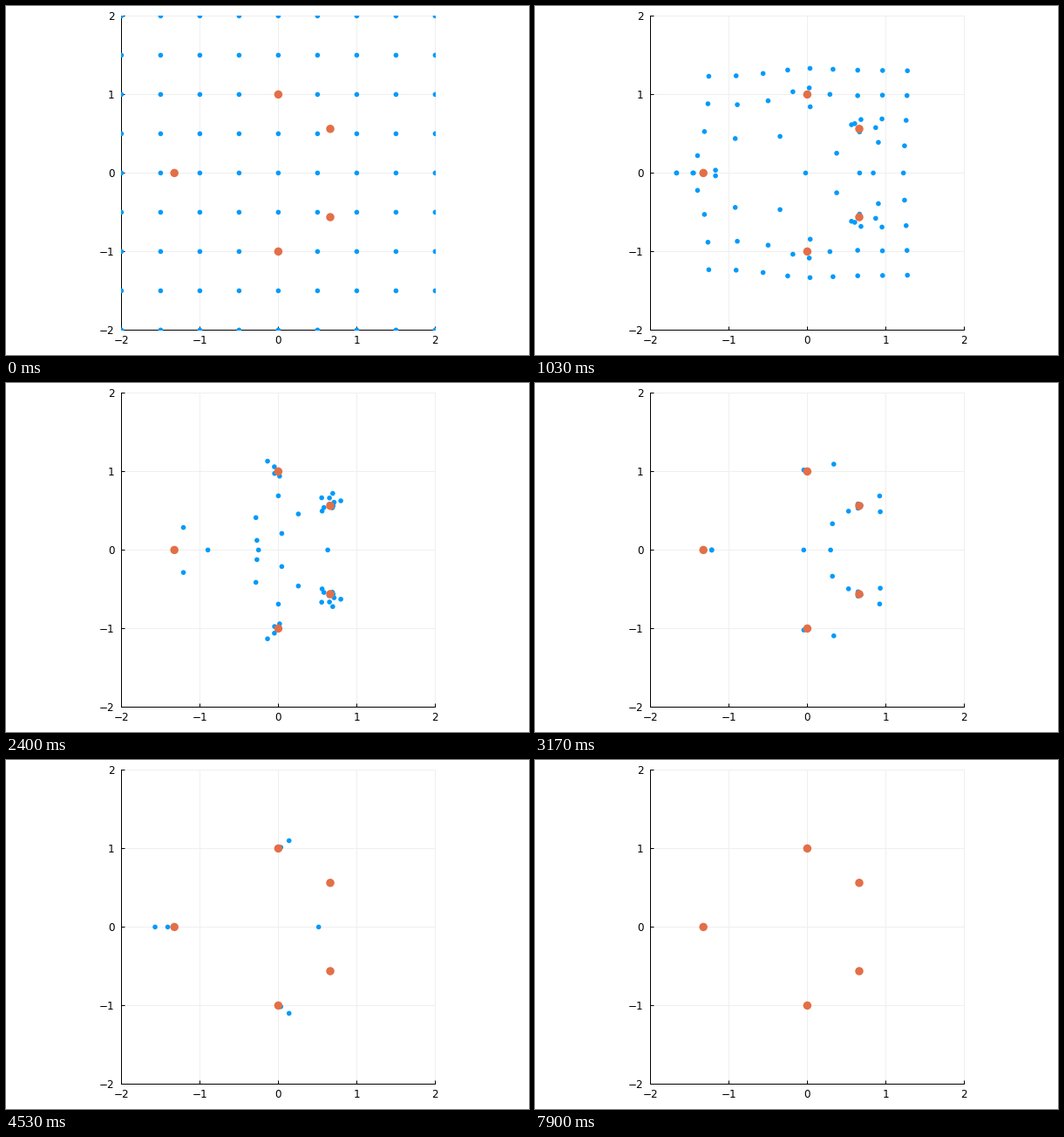
Write a matplotlib script that moves like this. It is 600 px wide and 400 px high and loops after 8 s.

```python
import matplotlib.pyplot as plt
import numpy as np
from matplotlib.animation import FuncAnimation
from matplotlib.transforms import Bbox

W, H, DPI = 600, 400, 100
LEFT, BOTTOM, SIDE = 132.4, 371.4, 360   # plot box in pixels, y down
FRAMES, STEP = 240, 15                   # frames per loop, per Newton step
BLUE, ORANGE = "#009AFA", "#E36F47"

COEFFS = [1, 0, 0, 1, -1, 1]             # z^5 + z^2 - z + 1
DERIV = np.polyder(COEFFS)


def newton(z):
    return z - np.polyval(COEFFS, z) / np.polyval(DERIV, z)


def pt(px):
    return px * 72 / DPI


def xy(z):
    return np.column_stack([z.real, z.imag])


def dots(z, diameter, color, zorder):
    sizes = np.full(z.size, pt(diameter) ** 2)
    return ax.scatter(z.real, z.imag, s=sizes, c=color, linewidths=0, zorder=zorder)


def label(x, y, value, align):
    text = str(value).replace("-", "\u2212")
    fig.text(x / W, 1 - y / H, text, ha=align, va="baseline",
             fontsize=pt(12), family="DejaVu Sans", color="black")


fig = plt.figure(figsize=(W / DPI, H / DPI), dpi=DPI, facecolor="white")
ax = fig.add_axes([LEFT / W, 1 - BOTTOM / H, SIDE / W, SIDE / H])
ax.set(xlim=(-2, 2), ylim=(-2, 2))
ticks = range(-2, 3)
ax.set_xticks(ticks, [""] * 5)
ax.set_yticks(ticks, [""] * 5)
ax.tick_params(direction="in", length=pt(4), width=pt(1))
ax.set_axisbelow(True)
ax.grid(color="#EFEFEF", linewidth=pt(1), clip_on=False)
for side, spine in ax.spines.items():
    spine.set_visible(side in ("left", "bottom"))
    spine.set_linewidth(pt(1))

for v in ticks:
    offset = (v + 2) * SIDE / 4
    label(LEFT + offset, 387, v, "center")
    label(124.4, BOTTOM - offset + 4.4, v, "right")

# Orbits of a square grid of starting points
axis = np.linspace(-2, 2, 9)
orbit = [(axis[:, None] + 1j * axis[None, :]).ravel()]
for _ in range(FRAMES // STEP):
    orbit.append(newton(orbit[-1]))

points = dots(orbit[0], 5.6, BLUE, 3)
# Clip to whole pixels, including the ones under the box edges
left, low = int(LEFT), H - 1 - int(BOTTOM)
points.set_clip_box(Bbox.from_extents(left, low, left + SIDE + 1, low + SIDE + 1))
dots(np.roots(COEFFS), 9.5, ORANGE, 4)


def update(i):
    step, j = divmod(i, STEP)
    ease = (1 - np.cos(np.pi * j / (STEP - 1))) / 2
    points.set_offsets(xy(orbit[step] + ease * (orbit[step + 1] - orbit[step])))
    return (points,)


anim = FuncAnimation(fig, update, frames=FRAMES, interval=8000 / FRAMES,
                     repeat=True, repeat_delay=0)
plt.show()
```
